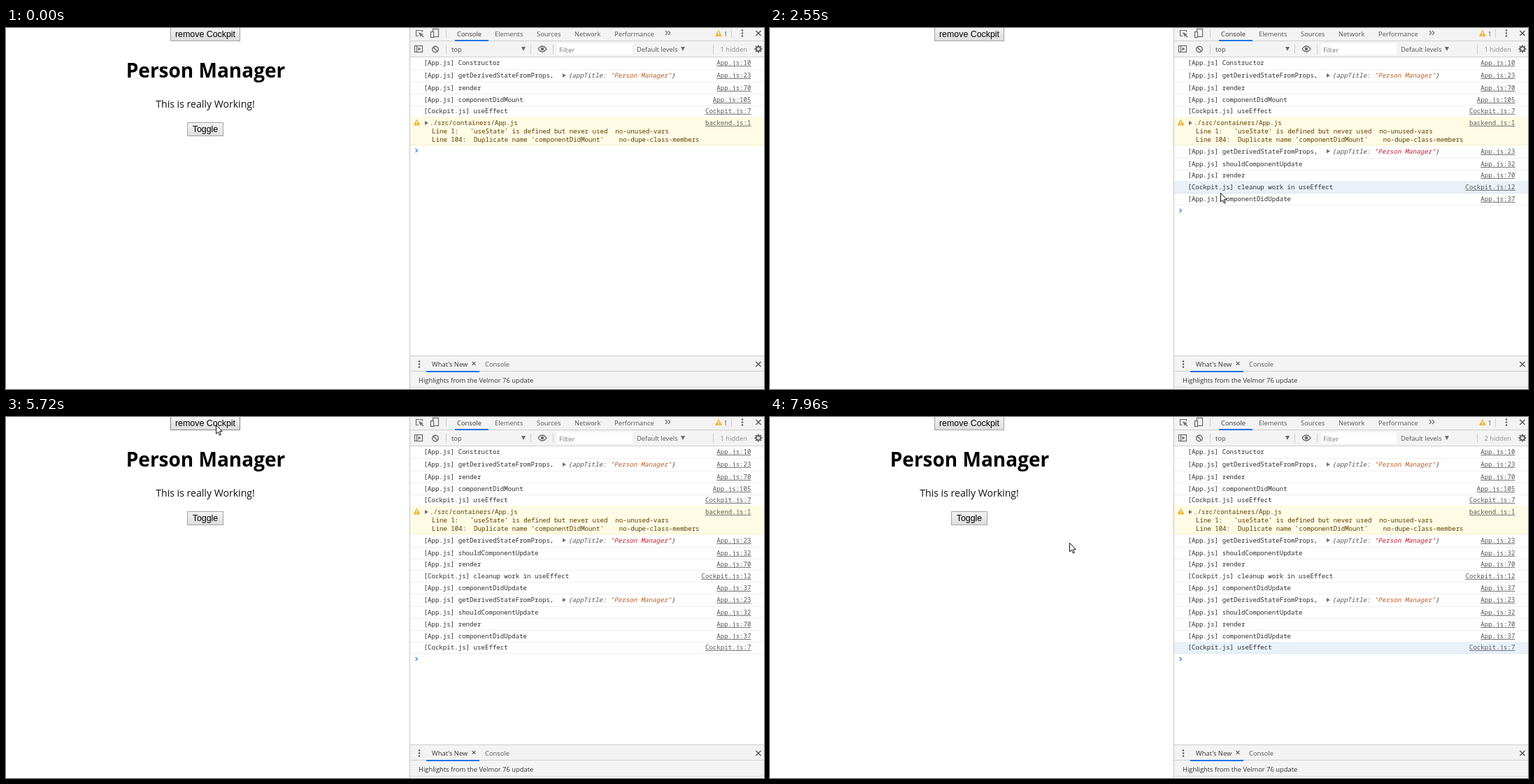
An HTML page with a canvas for the animation above (8000 ms loop, 1084 by 517 pixels).

```html
<!DOCTYPE html>
<html lang="en">
<head>
<meta charset="utf-8">
<title>Person Manager</title>
<style>
html, body { margin: 0; width: 100%; height: 100%; overflow: hidden; background: #fff; }
canvas { display: block; }
</style>
</head>
<body>
<canvas id="stage" width="1084" height="517"></canvas>
<script>
const ctx = document.getElementById('stage').getContext('2d');
const LOOP = 8000;
const UI = '"Open Sans", "Noto Sans", sans-serif';
const SMALL = '9.4px ' + UI;
const MONO = '9.12px "Noto Sans Mono", "DejaVu Sans Mono", monospace';
const BUTTON = '12.4px "Liberation Sans", Arial, sans-serif';
const PANEL = 577, RIGHT = 1084;
const ICON = '#6a6a6a';

// Console rows: [text, link, bottom edge, colour of the title string]
const PROPS = '[App.js] getDerivedStateFromProps,';
const ORANGE = '#bd5a20', RED = '#c5182c';
const rows = [
  ['[App.js] Constructor', 'App.js:10', 59],
  [PROPS, 'App.js:23', 77, ORANGE],
  ['[App.js] render', 'App.js:70', 94],
  ['[App.js] componentDidMount', 'App.js:105', 111],
  ['[Cockpit.js] useEffect', 'Cockpit.js:7', 127],
  ['', 'backend.js:1', 167],
  [PROPS, 'App.js:23', 186, RED],
  ['[App.js] shouldComponentUpdate', 'App.js:32', 203],
  ['[App.js] render', 'App.js:70', 219],
  ['[Cockpit.js] cleanup work in useEffect', 'Cockpit.js:12', 236],
  ['[App.js] componentDidUpdate', 'App.js:37', 253],
  [PROPS, 'App.js:23', 271, ORANGE],
  ['[App.js] shouldComponentUpdate', 'App.js:32', 288],
  ['[App.js] render', 'App.js:70', 305],
  ['[App.js] componentDidUpdate', 'App.js:37', 322],
  ['[Cockpit.js] useEffect', 'Cockpit.js:7', 338]
];
const WARNING = 5;

// Pointer moves: [first step, last step, number of steps, x, y]
const moves = [
  [70, 70, 1, 812, 350],
  [140, 210, 2, 309, 38],
  [380, 520, 3, 303, 21],
  [750, 830, 2, 305, 13],
  [1910, 2380, 7, 643, 237],
  [2550, 2780, 4, 647, 233],
  [2930, 3310, 6, 369, 55],
  [3390, 3460, 2, 366, 31],
  [3610, 3850, 4, 357, 12],
  [4320, 4390, 2, 295, 6],
  [5720, 5720, 1, 300, 11],
  [5800, 6480, 10, 644, 322],
  [6560, 6630, 2, 645, 332],
  [6800, 7030, 4, 703, 48],
  [7410, 7650, 4, 650, 330],
  [7720, 7960, 4, 428, 180]
];
moves[12] = [6560, 6560, 1, 644, 327];
moves.splice(13, 0, [6630, 6630, 1, 646, 337]);

const within = (t, a, b) => t >= a && t < b;

function rect(x, y, w, h, color) {
  ctx.fillStyle = color;
  ctx.fillRect(x, y, w, h);
}

function text(s, x, y, font, color, align = 'left') {
  ctx.font = font;
  ctx.fillStyle = color;
  ctx.textAlign = align;
  ctx.fillText(s, x, y);
}

function poly(points, fill, stroke, width = 1) {
  ctx.beginPath();
  points.forEach(([x, y]) => ctx.lineTo(x, y));
  ctx.closePath();
  if (fill) { ctx.fillStyle = fill; ctx.fill(); }
  if (stroke) { ctx.strokeStyle = stroke; ctx.lineWidth = width; ctx.stroke(); }
}

function line(x1, y1, x2, y2, color = ICON, width = 1.2) {
  ctx.beginPath();
  ctx.moveTo(x1, y1);
  ctx.lineTo(x2, y2);
  ctx.strokeStyle = color;
  ctx.lineWidth = width;
  ctx.stroke();
}

function box(x, y, w, h, color = ICON, width = 1.2) {
  ctx.strokeStyle = color;
  ctx.lineWidth = width;
  ctx.strokeRect(x, y, w, h);
}

function disc(x, y, r, color) {
  ctx.beginPath();
  ctx.arc(x, y, r, 0, 7);
  ctx.fillStyle = color;
  ctx.fill();
}

function ring(x, y, r, width, color = ICON) {
  ctx.beginPath();
  ctx.arc(x, y, r, 0, 7);
  ctx.strokeStyle = color;
  ctx.lineWidth = width;
  ctx.stroke();
}

function cross(x, y, r, width = 1.4) {
  line(x - r, y - r, x + r, y + r, '#555', width);
  line(x - r, y + r, x + r, y - r, '#555', width);
}

function dots(x, y) {
  for (const d of [-4, 0, 4]) disc(x, y + d, 1.2, '#555');
}

const downArrow = (x, y) => poly([[x - 3, y - 3], [x + 3, y - 3], [x, y + 3]], ICON);
const rightArrow = (x, y) => poly([[x, y - 3], [x + 5, y], [x, y + 3]], '#727272');

function warningSign(x, y) {
  poly([[x, y - 4], [x + 4.4, y + 4], [x - 4.4, y + 4]], '#efb83a', '#efb83a', 1);
  rect(x - 0.5, y - 2, 1.1, 3.2, '#fff');
  rect(x - 0.5, y + 2, 1.1, 1.1, '#fff');
}

function button(x, y, w, h, label, state) {
  const shade = {
    idle: ['#f5f5f5', '#dcdcdc', '#a4a4a4'],
    hover: ['#f7f7f7', '#dedede', '#868686'],
    down: ['#d6d6d6', '#ececec', '#808080']
  }[state];
  const g = ctx.createLinearGradient(0, y, 0, y + h);
  g.addColorStop(0, shade[0]);
  g.addColorStop(1, shade[1]);
  rect(x, y, w, h, g);
  box(x + 0.5, y + 0.5, w - 1, h - 1, shade[2], 1);
  text(label, x + w / 2, y + h / 2 + 4, BUTTON, '#000', 'center');
}

function buttonState(t) {
  if (within(t, 1210, 1290) || within(t, 5250, 5400)) return 'down';
  return within(t, 750, 1910) || within(t, 4320, 5800) ? 'hover' : 'idle';
}

function page(t) {
  button(235, -2, 100, 21, 'remove Cockpit', buttonState(t));
  if (within(t, 1290, 5400)) return;
  text('Person Manager', 285.5, 71, 'bold 28px ' + UI, '#000', 'center');
  text('This is really Working!', 285, 114, '14.1px ' + UI, '#111', 'center');
  button(259, 135, 52, 20, 'Toggle', 'idle');
}

function tabBar() {
  rect(PANEL, 0, RIGHT - PANEL, 41, '#f3f3f3');
  rect(PANEL, 18, RIGHT - PANEL, 1, '#cfcfcf');
  rect(PANEL, 41, RIGHT - PANEL, 1, '#d0d0d0');
  rect(642, 17, 48, 2, '#1a73e8');

  // inspect and device icons
  ctx.beginPath();
  ctx.moveTo(590, 11.5);
  ctx.lineTo(586.5, 11.5);
  ctx.lineTo(586.5, 3.5);
  ctx.lineTo(595.5, 3.5);
  ctx.lineTo(595.5, 6);
  ctx.strokeStyle = ICON;
  ctx.lineWidth = 1.2;
  ctx.stroke();
  poly([[590, 6], [597, 9], [594, 10], [593, 13]], ICON);
  line(593, 9, 597, 13);
  box(610.5, 1.5, 8, 11);
  rect(607, 5, 5, 9, '#f3f3f3');
  box(607.5, 5.5, 4, 8);

  const tabs = [['Console', 645], ['Elements', 699], ['Sources', 759], ['Network', 813], ['Performance', 870]];
  tabs.forEach(([s, x], i) => text(s, x, 12, SMALL, i ? '#555' : '#333'));
  for (const x of [943, 947]) {
    line(x, 4, x + 3, 7.2);
    line(x + 3, 6.8, x, 10);
  }
  warningSign(1019, 7.5);
  text('1', 1026.5, 12, SMALL, '#555');
  dots(1053, 7.5);
  cross(1076, 7.5, 3.6);
  for (const x of [629, 1037]) rect(x, 2, 1, 12, '#ccc');
}

function filterBar(t) {
  box(584.5, 25.5, 11, 9);
  line(587.5, 25, 587.5, 35);
  poly([[589.5, 27.5], [593.5, 30], [589.5, 32.5]], ICON);
  ring(614, 30.5, 4.3, 1.4);
  line(611, 27.5, 617, 33.5, ICON, 1.4);
  text('top', 637, 34, SMALL, '#444');
  downArrow(740, 30);

  ctx.beginPath();
  ctx.moveTo(761, 30);
  ctx.quadraticCurveTo(767, 22, 773, 30);
  ctx.quadraticCurveTo(767, 38, 761, 30);
  ctx.strokeStyle = ICON;
  ctx.lineWidth = 1.3;
  ctx.stroke();
  disc(767, 30, 2.3, ICON);

  rect(788, 22, 108, 16, '#fff');
  text('Filter', 791, 34.5, SMALL, '#777');
  text('Default levels', 902, 34, SMALL, '#555');
  downArrow(968, 30);
  text((t < 7410 ? 1 : 2) + ' hidden', 1060, 34, SMALL, '#8c8c8c', 'right');
  for (const x of [629, 750, 782, 1011]) rect(x, 24, 1, 13, '#ccc');

  for (let i = 0; i < 8; i++) {
    const a = i * Math.PI / 4, c = Math.cos(a), s = Math.sin(a);
    line(1076 + 3 * c, 30 + 3 * s, 1076 + 5.6 * c, 30 + 5.6 * s, ICON, 2);
  }
  ring(1076, 30, 3.2, 2.2);
}

function warningText() {
  const brown = '#5c3c00';
  warningSign(587.5, 135);
  rightArrow(599, 136);
  text('./src/containers/App.js', 606, 138.5, MONO, brown);
  text("Line 1:   'useState' is defined but never used  no-unused-vars", 609, 150.5, MONO, brown);
  text("Line 104:  Duplicate name 'componentDidMount'    no-dupe-class-members", 609, 162.5, MONO, brown);
}

function props(y, color) {
  const font = 'italic ' + MONO;
  rightArrow(796, y - 3);
  let x = 804;
  for (const [s, c] of [['{appTitle: ', '#565656'], ['"Person Manager"', color], ['}', '#444']]) {
    text(s, x, y, font, c);
    x += ctx.measureText(s).width;
  }
}

function consoleLog(t) {
  const count = t < 1370 ? 6 : t < 5490 ? 11 : 16;
  const lit = within(t, 2550, 5250) ? 9 : t >= 7650 ? 15 : -1;
  let top = 41;
  rows.slice(0, count).forEach(([label, link, bottom, color], i) => {
    const warn = i === WARNING;
    const y = warn ? 138.5 : (top + bottom) / 2 + 3;
    if (warn) rect(PANEL + 1, top, RIGHT, bottom - top, '#fffbe5');
    if (i === lit) rect(PANEL + 1, top, RIGHT, bottom - top, '#ebf1f9');
    rect(PANEL + 1, bottom, RIGHT, 1, warn || i === WARNING - 1 ? '#fbf0c4' : i === lit ? '#dde5f0' : '#efefef');
    if (warn) warningText();
    text(label, 597.5, y, MONO, '#303030');
    if (color) props(y, color);
    text(link, 1065.5, y, MONO, '#555', 'right');
    const w = ctx.measureText(link).width;
    rect(1065.5 - w, Math.round(y + 1), w, 1, '#777');
    top = bottom;
  });
  line(585.5, top + 6, 588.7, top + 8.5, '#3b82e8', 1.4);
  line(588.7, top + 8.5, 585.5, top + 11, '#3b82e8', 1.4);
}

function drawer() {
  rect(PANEL, 469, RIGHT, 48, '#f3f3f3');
  rect(PANEL, 469, RIGHT, 1, '#ccc');
  rect(PANEL, 491, RIGHT, 1, '#cfcfcf');
  rect(601, 491, 76, 2, '#1a73e8');
  rect(PANEL, 514, RIGHT, 1, '#d4d4d4');
  rect(PANEL, 515, RIGHT, 2, '#fff');
  dots(591, 481.5);
  text("What's New", 609, 485, SMALL, '#333');
  cross(669, 480.5, 2.4, 1.2);
  text('Console', 685, 485, SMALL, '#555');
  cross(1076, 481.5, 3.6);
  text('Highlights from the Velmor 76 update', 590, 508, SMALL, '#333');
}

function dialog(t) {
  if (!within(t, 6480, 7410)) return;
  ctx.save();
  ctx.globalAlpha = t < 6560 ? 0.6 : t < 7340 ? 1 : 0.5;
  ctx.shadowColor = 'rgba(0,0,0,.6)';
  ctx.shadowBlur = 5;
  ctx.shadowOffsetY = 1;
  rect(334, -10, 414, 94, '#fff');
  ctx.shadowColor = 'rgba(0,0,0,.3)';
  ctx.shadowBlur = 3;
  ctx.beginPath();
  ctx.roundRect(674, 39.5, 60, 30, 3);
  ctx.fillStyle = within(t, 7260, 7410) ? '#4a86e8' : '#649cf6';
  ctx.fill();
  ctx.shadowColor = 'transparent';
  text('Saved data to Cloud', 349, 21, '12px ' + UI, '#5f6368');
  text('확인', 704, 58.5, '12px "Noto Sans CJK KR", "Noto Sans CJK", sans-serif', '#fff', 'center');
  ctx.restore();
}

// The pointer advances in even time steps and rests between moves.
function pointerAt(t) {
  let [, , , x, y] = moves[0];
  for (const [start, end, steps, tx, ty] of moves) {
    if (t < start) break;
    const gap = steps > 1 ? (end - start) / (steps - 1) : 1;
    const u = Math.min(steps, Math.floor((t - start) / gap + 1.01)) / steps;
    const e = steps > 5 ? u * u * (3 - 2 * u) : u;
    x += (tx - x) * e;
    y += (ty - y) * e;
  }
  return [Math.round(x), Math.round(y)];
}

function pointer(t) {
  if (t < moves[0][0]) return;
  const [x, y] = pointerAt(t);
  ctx.save();
  ctx.translate(x + 0.5, y + 0.5);
  poly([[0, 0], [0, 12.5], [2.9, 9.9], [4.9, 14.6], [6.8, 13.8], [4.9, 9.2], [8.8, 9.2]], '#fff', '#111', 1);
  ctx.restore();
}

function draw(now) {
  const t = now % LOOP;
  rect(0, 0, RIGHT, 517, '#fff');
  page(t);
  tabBar();
  filterBar(t);
  consoleLog(t);
  drawer();
  rect(PANEL, 0, 1, 517, '#c4c4c4');
  dialog(t);
  pointer(t);
}

let began;
function tick(now) {
  began ??= now;
  draw(now - began);
  requestAnimationFrame(tick);
}
requestAnimationFrame(tick);
</script>
</body>
</html>
```
